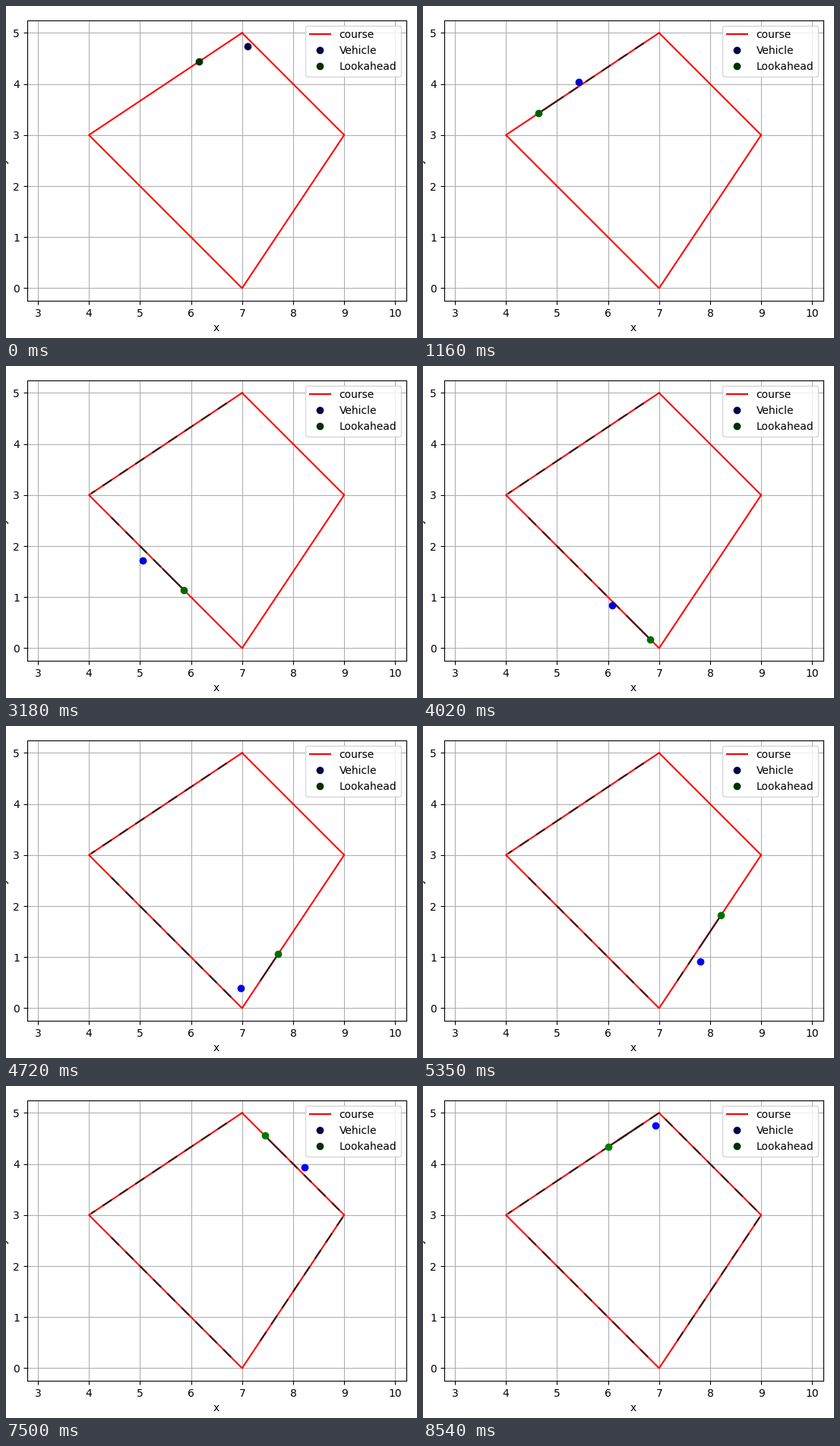
Animation, 541 px wide and 437 px high, one loop 8610 ms. Source, as a matplotlib script:

```python
import numpy as np
import matplotlib.pyplot as plt
from matplotlib.animation import FuncAnimation

W, H, DPI = 541, 437, 100
FRAMES, INTERVAL = 123, 70
STEPS = 120
HOLDS = (21, 85, 97)        # frames where the simulation pauses one tick
LOOK_DIST = 1.0
SCALE = 67.2                # pixels per data unit
LEFT, BOTTOM, WIDTH, HEIGHT = 27.6, 48.8, 499.1, 369.6

plt.rcParams["font.family"] = "DejaVu Sans"

# Closed course, walked anticlockwise from the top
course = np.array([(7, 5), (4, 3), (7, 0), (9, 3), (7, 5)], float)
corner_s = np.r_[0, np.cumsum(np.hypot(*np.diff(course, axis=0).T))]
lap = corner_s[-1]


def on_course(s):
    s = np.mod(s, lap)
    return np.array([np.interp(s, corner_s, course[:, i]) for i in (0, 1)])


# Key poses of the vehicle's loop: step, x, y
LAP_STEPS = 117.3
poses = np.array([
    (0, 7.11, 4.74), (16, 5.42, 4.035), (31, 4.36, 2.82), (37, 4.55, 2.26),
    (50, 5.58, 1.31), (66, 6.97, 0.39), (75, 7.80, 0.915), (92, 8.70, 2.65),
    (104, 8.23, 3.94), (113, 7.57, 4.60)])


def drive(t):
    """Smooth periodic curve through the key poses."""
    loop = np.vstack([poses + (turn * LAP_STEPS, 0, 0) for turn in (-1, 0, 1)])
    tk, p = loop[:, 0], loop[:, 1:]
    m = np.gradient(p, tk, axis=0)
    i = np.searchsorted(tk, t, "right") - 1
    h = (tk[i + 1] - tk[i])[:, None]
    u = (t - tk[i])[:, None] / h
    return ((2*u**3 - 3*u**2 + 1) * p[i] + (u**3 - 2*u**2 + u) * h * m[i]
            + (3*u**2 - 2*u**3) * p[i + 1] + (u**3 - u**2) * h * m[i + 1])


def follow(path):
    """Farthest course position ahead that lies within the lookahead circle."""
    s, found = 0.9, []
    for x, y in path:
        ahead = s + np.arange(0, 1.2, 0.002)
        cx, cy = on_course(ahead)
        near = np.hypot(cx - x, cy - y) <= LOOK_DIST
        if near.any():
            s = ahead[near][-1]
        found.append(s)
    return np.array(found)


vehicle = drive(np.arange(STEPS))
look_s = follow(vehicle)
look = on_course(look_s).T

# Step at which each piece of course is swept by the lookahead point
trail_s = np.arange(0.36, lap + 1.3, 0.01)
trail_xy = on_course(trail_s)
swept = np.full(trail_s.shape, STEPS)
swept[trail_s <= look_s[0]] = 1
for k in range(1, STEPS):
    a, b = look_s[k - 1], look_s[k]
    if b - a < 0.27:        # corner jumps leave a gap
        swept[(trail_s > a) & (trail_s <= b)] = k
dash = np.mod((trail_s - 0.36) * SCALE / 26, 1) < 0.56

fig = plt.figure(figsize=(W / DPI, H / DPI), dpi=DPI, facecolor="white")
ax = fig.add_axes([LEFT / W, BOTTOM / H, WIDTH / W, HEIGHT / H])
ax.set_xlim(6.5 - WIDTH / SCALE / 2, 6.5 + WIDTH / SCALE / 2)
ax.set_ylim(-0.25, 5.25)
ax.set_xlabel("x")
ax.set_ylabel("y")
ax.grid(True)

NAVY, PINE = (0, 0, 0.27), (0, 0.19, 0)
ax.plot(*course.T, "-r", label="course")
ax.plot([], [], "o", color=NAVY, label="Vehicle")
ax.plot([], [], "o", color=PINE, label="Lookahead")
ax.legend(loc="upper right")

trail, = ax.plot([], [], color="#301a1a", lw=1.5, solid_capstyle="butt")
car, = ax.plot([], [], "o")
goal, = ax.plot([], [], "o")


def draw(n):
    k = min(n - sum(n >= h for h in HOLDS), STEPS - 1)
    fresh = trail_s > look_s[k] - 0.6
    shown = (swept <= k) & (dash | fresh)
    trail.set_data(np.where(shown, trail_xy[0], np.nan), trail_xy[1])
    car.set_data(vehicle[k, :1], vehicle[k, 1:])
    goal.set_data(look[k, :1], look[k, 1:])
    # Markers start dark, then brighten slowly
    t = k / STEPS
    car.set_color((0, 0, 0.76 + 0.24 * t) if k else NAVY)
    goal.set_color((0, 0.36 + 0.13 * t, 0) if k else PINE)
    return trail, car, goal


anim = FuncAnimation(fig, draw, frames=FRAMES, interval=INTERVAL,
                     repeat=True, repeat_delay=0, blit=False)
plt.show()
```
